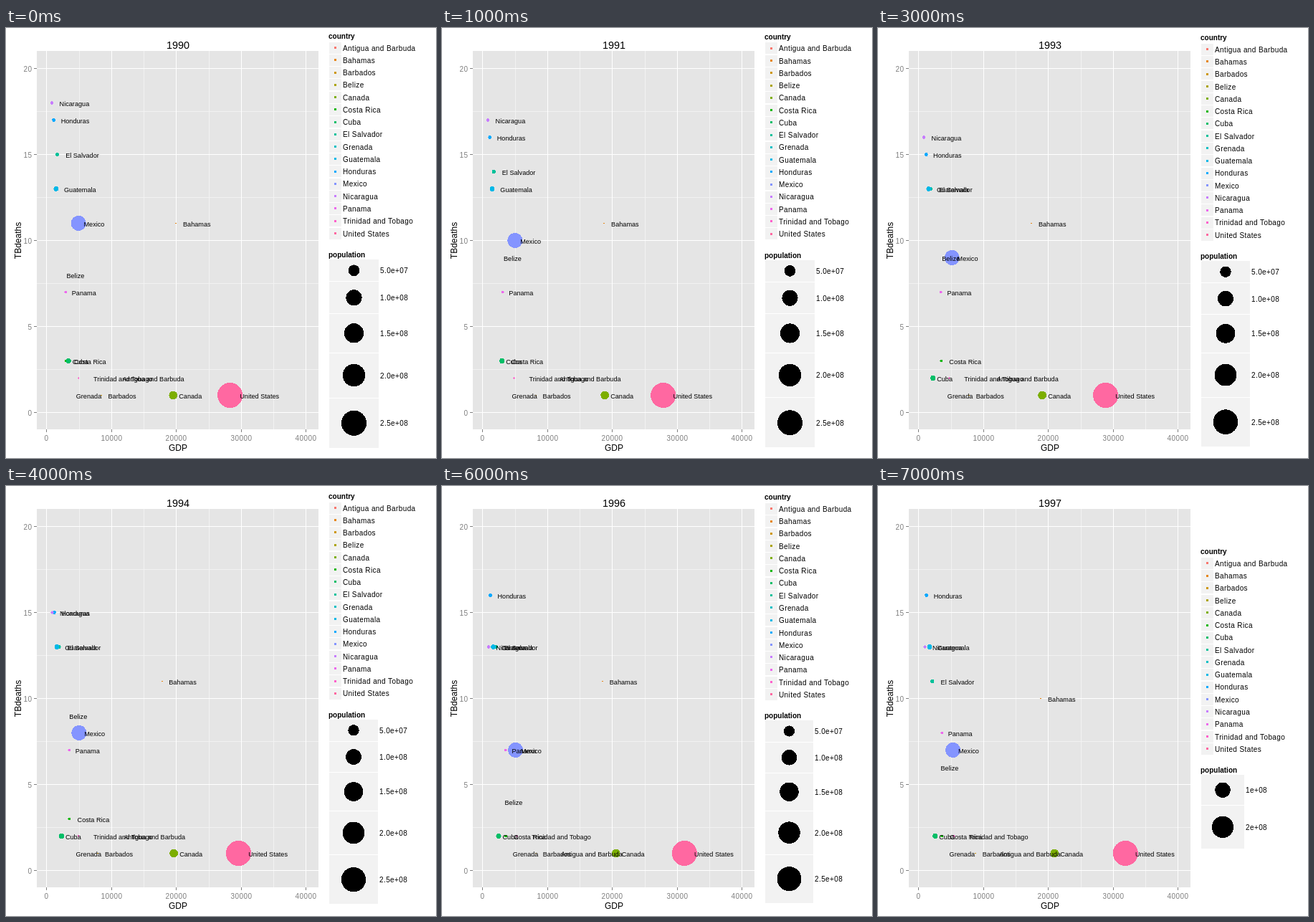
Recreate the animation shown at these times as an HTML page. Size 600 by 600 pixels, loop 8000 ms.

```html
<!DOCTYPE html>
<html lang="en">
<head>
<meta charset="utf-8">
<title>TB deaths by GDP</title>
<style>
html, body { margin: 0; width: 100%; height: 100%; overflow: hidden; background: #fff; }
svg { display: block; width: 600px; height: 600px; font-family: "Liberation Sans", Arial, sans-serif; }
.mid { text-anchor: middle; }
.end { text-anchor: end; }
.title { font-size: 14.4px; }
.axis { font-size: 12px; }
.tick { font-size: 10px; letter-spacing: .4px; fill: #7f7f7f; }
.name { font-size: 9.15px; }
.head { font-size: 10px; font-weight: bold; }
.item { font-size: 10px; letter-spacing: .4px; }
.key { fill: #f2f2f2; }
line, rect, circle { shape-rendering: crispEdges; }
</style>
</head>
<body>
<svg viewBox="0 0 600 600">
  <g id="panel"></g>
  <g id="plot"></g>
  <g id="legend"></g>
</svg>
<script>
const YEARS = 8, STEP = 1000, FIRST = 1990;

// name, population in millions, then turning points by year: GDP in thousands, deaths
const countries = [
  ['Antigua and Barbuda', .06, { 0: 9.4, 3: 9.75, 5: 9.4, 7: 10.1 }, { 4: 2, 5: 1 }],
  ['Bahamas', .26, { 0: 20, 1: 18.8, 3: 17.45, 7: 18.9 }, { 6: 11, 7: 10 }],
  ['Barbados', .26, { 0: 8.45, 3: 7.8, 6: 8.25, 7: 8.8 }, { 0: 1 }],
  ['Belize', .19, { 0: 2.43, 3: 2.95, 5: 2.77 }, { 0: 8, 1: 9, 5: 9, 6: 4, 7: 6 }],
  ['Canada', 28, { 0: 19.55, 1: 18.88, 3: 19.1, 5: 20.2, 7: 20.98 }, { 0: 1 }],
  ['Costa Rica', 3.1, { 0: 3.05, 3: 3.53, 7: 3.64 }, { 5: 3, 6: 2 }],
  ['Cuba', 10.6, { 0: 3.42, 3: 2.26, 7: 2.6 }, { 0: 3, 3: 2 }],
  ['El Salvador', 5.3, { 0: 1.68, 7: 2.17 }, { 0: 15, 5: 12, 6: 13, 7: 11 }],
  ['Grenada', .1, { 0: 3.6, 3: 3.5, 7: 3.8 }, { 0: 1 }],
  ['Guatemala', 9, { 0: 1.5, 7: 1.73 }, { 0: 13 }],
  ['Honduras', 5, { 0: 1.16, 7: 1.27 }, { 0: 17, 5: 14, 6: 16 }],
  ['Mexico', 90, { 0: 4.97, 3: 5.2, 5: 4.9, 7: 5.35 }, { 0: 11, 6: 7 }],
  ['Nicaragua', 4.1, { 3: .88, 7: 1.02 }, { 0: 18, 6: 13 }],
  ['Panama', 2.6, { 0: 2.98, 3: 3.5, 7: 3.64 }, { 6: 7, 7: 8 }],
  ['Trinidad and Tobago', 1.2, { 0: 4.97, 3: 4.78, 7: 5.5 }, { 0: 2 }],
  ['United States', 249, { 0: 28.31, 1: 27.88, 3: 28.86, 7: 31.92 }, { 0: 1 }]
];

const $ = id => document.getElementById(id);
const px = gdp => 56.25 + gdp * 9.055;
const py = deaths => 536.5 - deaths * 24;

const text = (x, y, s, cls, more = '') => `<text x="${x}" y="${y}" class="${cls}" ${more}>${s}</text>`;
const dot = (x, y, r, fill) => `<circle cx="${x}" cy="${y}" r="${r}" fill="${fill}"/>`;
const box = (x, y, w, h, attr) => `<rect x="${x}" y="${y}" width="${w}" height="${h}" ${attr}/>`;
const line = (x1, y1, x2, y2, c) => `<line x1="${x1}" y1="${y1}" x2="${x2}" y2="${y2}" stroke="${c}"/>`;

const pen = document.createElement('canvas').getContext('2d');
pen.font = '9.15px "Liberation Sans", Arial, sans-serif';

// Linear between turning points, constant outside them
function at(path, year) {
  const keys = Object.keys(path).map(Number);
  const i = keys.findIndex(k => k >= year);
  if (i < 0) return path[keys[keys.length - 1]];
  if (i === 0) return path[keys[0]];
  const a = keys[i - 1], b = keys[i];
  return path[a] + (path[b] - path[a]) * (year - a) / (b - a);
}

// Evenly spaced hues in polar LUV, chroma 100, lightness 65
function hue(i) {
  const h = (15 + i * 360 / countries.length) * Math.PI / 180, L = 65, C = 100;
  const Y = ((L + 16) / 116) ** 3;
  const u = C * Math.cos(h) / (13 * L) + .19784, v = C * Math.sin(h) / (13 * L) + .46834;
  const X = 9 * Y * u / (4 * v), Z = 3 * Y / v - 5 * Y - X / 3;
  const gamma = c => c <= .00304 ? 12.92 * c : 1.055 * c ** (1 / 2.4) - .055;
  const rgb = [
    3.2405 * X - 1.5372 * Y - .4985 * Z,
    -.9693 * X + 1.876 * Y + .0416 * Z,
    .0556 * X - .204 * Y + 1.0573 * Z
  ].map(c => Math.round(255 * Math.min(1, Math.max(0, gamma(c)))));
  return `rgb(${rgb})`;
}

// The largest population always fills the same circle
const largest = year => 249 + 2.85 * year;
const radius = (pop, year) => 17.57 * Math.sqrt(pop / largest(year));

function drawPanel() {
  let s = box(43, 32, 393, 528, 'fill="#e5e5e5"');
  const col = g => Math.round(px(g)) + .5;
  const vert = (g, c) => line(col(g), 32, col(g), 560, c);
  const horiz = (d, c) => line(43, py(d), 436, py(d), c);
  for (let i = 0; i < 4; i++) s += vert(5 + i * 10, '#f2f2f2') + horiz(2.5 + i * 5, '#f2f2f2');
  for (let i = 0; i < 5; i++) {
    const x = col(i * 10), y = py(i * 5);
    s += vert(i * 10, '#fff') + horiz(i * 5, '#fff');
    s += line(x, 560, x, 564, '#7f7f7f') + line(39, y, 43, y, '#7f7f7f');
    s += text(x, 576, i * 10000, 'tick mid') + text(36.5, y + 4.5, i * 5, 'tick end');
  }
  s += text(240, 590, 'GDP', 'axis mid');
  s += text(0, 0, 'TBdeaths', 'axis mid', 'transform="translate(21 296.5) rotate(-90)"');
  $('panel').innerHTML = s;
}

function drawPlot(year) {
  let dots = '', names = '';
  countries.forEach(([name, pop, gdp, deaths], i) => {
    const x = px(at(gdp, year)), y = py(Math.round(at(deaths, year)));
    const r = radius(pop, 0);
    if (r > .5) dots += dot(x, y, Math.max(r, 1), hue(i));
    names += text(x + pen.measureText(name).width / 4, y + 4.3, name, 'name');
  });
  $('plot').innerHTML = text(240, 29, FIRST + year, 'title mid') + dots + names;
}

function drawLegend(year) {
  const coarse = largest(year) > 268;
  const sizes = coarse ? [100, 200] : [50, 100, 150, 200, 250];
  const rows = sizes.map(p => 4 * radius(p, year));
  const width = Math.round(Math.max(...rows)) - 1;
  const top = 297 - (316 + rows.reduce((a, b) => a + b)) / 2;

  let s = text(450, top + 8, 'country', 'head');
  countries.forEach(([name], i) => {
    const y = top + 21 + i * 17.26;
    s += box(451, Math.round(y - 8.3), 17, 16, 'class="key"');
    s += dot(459.5, Math.round(y) - .5, 1.4, hue(i)) + text(470, y + 3.6, name, 'item');
  });

  s += text(450, top + 313, 'population', 'head');
  let edge = top + 316;
  rows.forEach((h, i) => {
    const y = edge + h / 2 - .5, label = (sizes[i] * 1e6).toExponential(coarse ? 0 : 1).replace('+', '+0');
    s += box(451, Math.round(edge), width, Math.round(edge + h) - Math.round(edge) - 1, 'class="key"');
    s += dot(451 + width / 2, y, h / 4, '#000') + text(453 + width, y + 4, label, 'item');
    edge += h;
  });
  $('legend').innerHTML = s;
}

let shown = -1;
const start = performance.now();

function frame() {
  const year = Math.floor((performance.now() - start) / STEP) % YEARS;
  if (year !== shown) {
    shown = year;
    drawPlot(year);
    drawLegend(year);
  }
  requestAnimationFrame(frame);
}

drawPanel();
frame();
</script>
</body>
</html>
```
